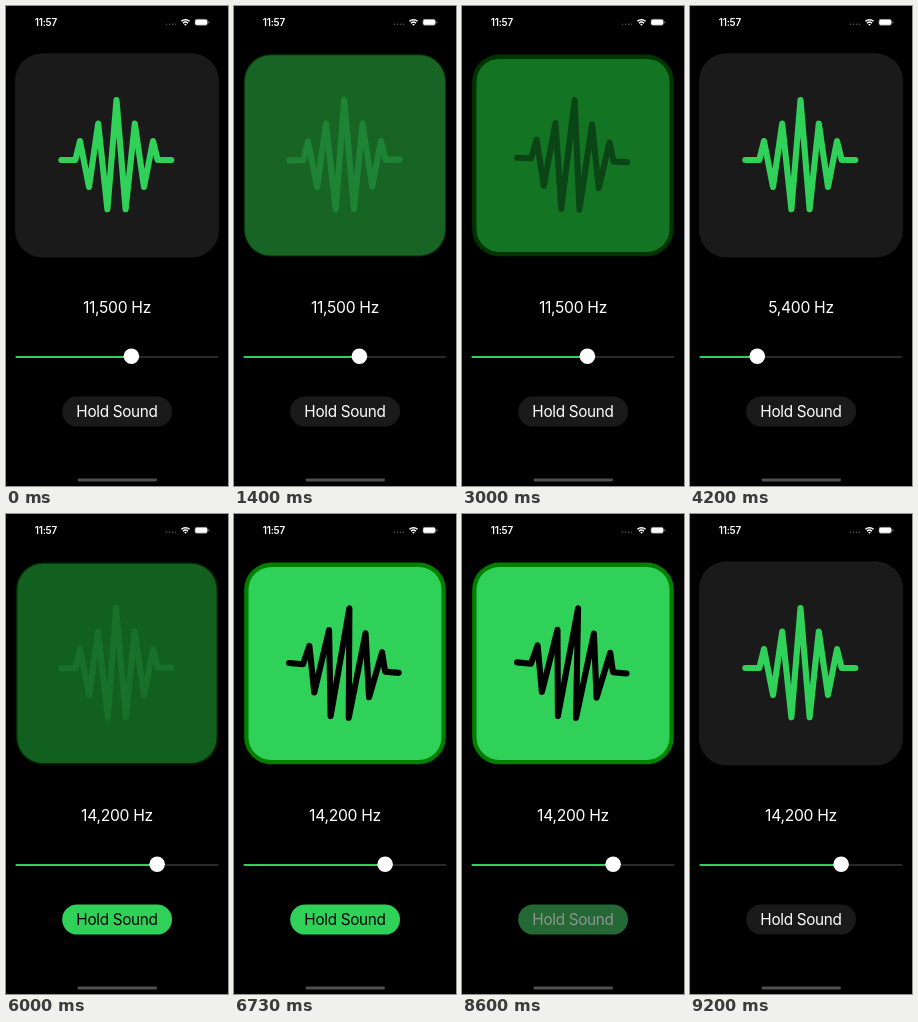
These frames come from a looping animation (222x480 px, 9340 ms). An HTML page:

```html
<!DOCTYPE html>
<html lang="en">
<head>
<meta charset="utf-8">
<title>Tone generator</title>
<style>
  html, body { margin: 0; width: 100%; height: 100%; overflow: hidden; background: #000; }
  svg { display: block; width: 100vw; height: 100vh; }
  text { font-family: Inter, Roboto, sans-serif; letter-spacing: -.02em; fill: #fff; }
</style>
</head>
<body>
<svg viewBox="0 0 222 480">
  <!-- status bar -->
  <text x="28.7" y="20" font-size="9.9" font-weight="600">11:57</text>
  <path d="M160.5 18.3h11" stroke="#555" stroke-width="1.6" stroke-linecap="round" stroke-dasharray="0 3"/>
  <g fill="none" stroke="#fff" stroke-width="1.5">
    <path d="M175.4 15.3a5.9 5.9 0 0 1 8.2 0M177 17.2a3.6 3.6 0 0 1 5 0"/>
    <path d="M178.2 18.4a1.8 1.8 0 0 1 2.6 0L179.5 19.8z" fill="#fff" stroke="none"/>
  </g>
  <rect x="189" y="13.3" width="12.4" height="5.9" rx="1.8" fill="#fff" stroke="#777" stroke-width=".6"/>
  <path d="M202.8 15.3v2" stroke="#777"/>

  <rect id="border"/>
  <rect id="tile"/>
  <path id="wave" fill="none" stroke-width="6.1" stroke-linecap="round" stroke-linejoin="round"
    d="M55.3 154H69.3L74 135L83 181L92.2 117.5L101.4 203.3L110.5 94L119.6 203.3L128.8 117.5L138 181L147 135L151.7 154H165.3"/>

  <text id="hz" x="111" y="306.6" font-size="15.7" text-anchor="middle"></text>
  <path d="M10.500 351H211.500" stroke="#28282a" stroke-width="2" stroke-linecap="round"/>
  <path id="level" stroke="#30d158" stroke-width="2" stroke-linecap="round"/>
  <circle id="thumb" cy="350.2" r="7.8" fill="#fff"/>

  <g id="button">
    <rect id="pill" x="56.2" y="390.4" width="109.8" height="30.2" rx="15.1"/>
    <text id="hold" x="111" y="411.2" font-size="15.3" text-anchor="middle">Hold Sound</text>
  </g>
  <rect x="71.500" y="472.6" width="79.500" height="2.8" rx="1.4" fill="#505050"/>
</svg>
<script>
const LOOP = 9340;
const GRAY = [26, 26, 27], LIME = [48, 209, 88], GREEN = [0, 128, 0];
const BLACK = [0, 0, 0], WHITE = [255, 255, 255];

const $ = id => document.getElementById(id);
const set = (id, attrs) => {
  for (const key in attrs) $(id).setAttribute(key, attrs[key]);
};
const mix = (a, b, p) => `rgb(${a.map((v, i) => Math.round(v + (b[i] - v) * p))})`;
const ramp = (t, start, time) => Math.min(1, Math.max(0, (t - start) / time));
const pulse = (t, on, off, time) => ramp(t, on, time) - ramp(t, off, time);
const smooth = p => p * p * (3 - 2 * p);

function box(id, inset, radius, fill, opacity) {
  const size = 203.6 - 2 * inset;
  set(id, {
    x: 9.2 + inset, y: 47.6 + inset, width: size, height: size, rx: radius,
    fill, 'fill-opacity': opacity
  });
}

function drawTile(t) {
  const active = pulse(t, 1330, 3000, 300) + pulse(t, 5900, 8850, 300);
  const opacity = 1 - 0.6 * (pulse(t, 1330, 3000, 90) + pulse(t, 5900, 6350, 90));
  const glow = 1 - (1 - active) ** 4;
  const edge = 4.3 * active;
  box('border', glow, 27, mix(GRAY, GREEN, glow), opacity);
  box('tile', glow + edge, 27 - edge, mix(GRAY, LIME, glow), opacity);

  const start = t < 5000 ? 1478 : 6036;
  const angle = 8 * active ** 2 * Math.sin((t - start) / 500 * 2 * Math.PI);
  set('wave', {
    stroke: mix(LIME, BLACK, active), 'stroke-opacity': opacity,
    transform: `rotate(${angle} 110.5 149)`
  });
}

function drawSlider(t) {
  const down = smooth(ramp(t, 3400, 550)), up = smooth(ramp(t, 4011, 500));
  const hz = Math.round(115 - 100 * down + 122 * up + 5 * ramp(t, 4450, 450)) * 100;
  const x = 15.8 + hz * 0.00953;
  $('hz').textContent = hz.toLocaleString('en-US') + ' Hz';
  set('thumb', { cx: x });
  set('level', { d: `M10.500 351H${x}` });
}

function drawButton(t) {
  const held = pulse(t, 5200, 8400, 350);
  const down = pulse(t, 5030, 5250, 120) + pulse(t, 8250, 8450, 120);
  set('button', { opacity: 1 - 0.6 * down });
  set('pill', { fill: mix(GRAY, LIME, held) });
  $('hold').style.fill = mix(WHITE, BLACK, held);
}

function tick() {
  const t = performance.now() % LOOP;
  drawTile(t);
  drawSlider(t);
  drawButton(t);
  requestAnimationFrame(tick);
}
tick();
</script>
</body>
</html>
```
